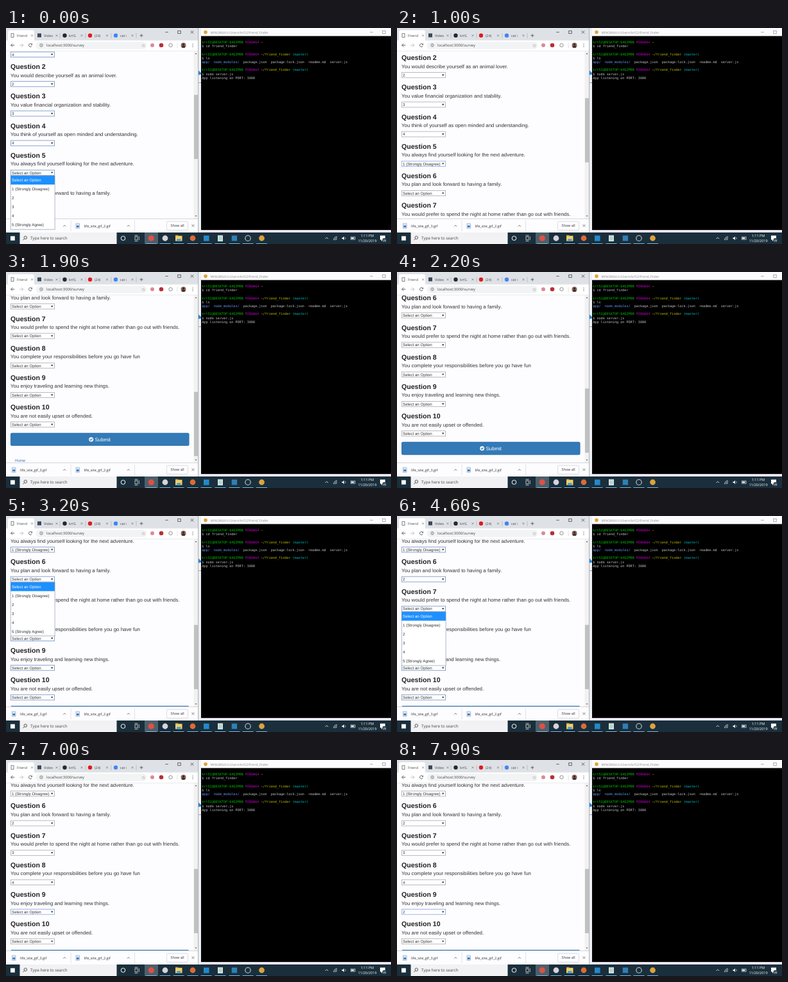
Recreate the animation shown at these times as an HTML page with a canvas. Size 600 by 338 pixels, loop 8 s.

```html
<!DOCTYPE html>
<html lang="en">
<head>
<meta charset="utf-8">
<title>Survey and server</title>
<style>
html, body { margin: 0; width: 100%; height: 100%; overflow: hidden; background: #fff; }
canvas { display: block; width: 600px; height: 338px; }
</style>
</head>
<body>
<canvas id="stage"></canvas>
<script>
const W = 600, H = 338, LOOP = 8000;
const canvas = document.getElementById('stage');
const ctx = canvas.getContext('2d', { alpha: false });
const dpr = window.devicePixelRatio || 1;
canvas.width = W * dpr;
canvas.height = H * dpr;
ctx.scale(dpr, dpr);
ctx.textRendering = 'geometricPrecision';

const ARIAL = '"Liberation Sans", Arial, sans-serif';
const UI = '"Open Sans", "Noto Sans", sans-serif';
const MONO = '"DejaVu Sans Mono", "Liberation Mono", monospace';
const PAGE = '#fdfcff';

const questions = [
  'You enjoy meeting new people.',
  'You would describe yourself as an animal lover.',
  'You value financial organization and stability.',
  'You think of yourself as open minded and understanding.',
  'You always find yourself looking for the next adventure.',
  'You plan and look forward to having a family.',
  'You would prefer to spend the night at home rather than go out with friends.',
  'You complete your responsibilities before you go have fun',
  'You enjoy traveling and learning new things.',
  'You are not easily upset or offended.'
];
const options = ['Select an Option', '1 (Strongly Disagree)', '2', '3', '4', '5 (Strongly Agree)'];

// time, focused question, highlighted option (-1: list closed)
const steps = [
  [0, 5, 0], [500, 5, 1], [700, 5, -1],
  [2800, 6, -1], [2900, 6, 0], [3500, 6, 1], [3600, 6, 2], [3700, 6, -1],
  [4200, 7, -1], [4300, 7, 0], [5000, 7, 3], [5100, 7, -1],
  [5800, 8, -1], [5900, 8, 0], [6300, 8, 1], [6400, 8, 3], [6500, 8, 4], [6600, 8, -1],
  [7000, 9, -1], [7100, 9, 0], [7700, 9, 1], [7800, 9, 2], [7900, 9, -1]
];
// question: [time answered, option]
const answers = { 1: [0, 4], 2: [0, 2], 3: [0, 3], 4: [0, 4], 5: [700, 1], 6: [3700, 2], 7: [5100, 3], 8: [6600, 4], 9: [7900, 2] };
const scrollKeys = [
  [900, 0], [1000, 14], [1100, 54], [1200, 102], [1300, 143.3], [1500, 186],
  [1700, 213], [1900, 218.7], [2100, 215], [2400, 184], [2700, 173.6]
];

function scrollAt(t) {
  if (t <= scrollKeys[0][0]) return 0;
  for (let i = 1; i < scrollKeys.length; i++) {
    const [t1, s1] = scrollKeys[i], [t0, s0] = scrollKeys[i - 1];
    if (t <= t1) return s0 + (s1 - s0) * (t - t0) / (t1 - t0);
  }
  return scrollKeys[scrollKeys.length - 1][1];
}

function rect(x, y, w, h, color) {
  ctx.fillStyle = color;
  ctx.fillRect(x, y, w, h);
}

function frame(x, y, w, h, color, width = 1) {
  ctx.strokeStyle = color;
  ctx.lineWidth = width;
  ctx.strokeRect(x, y, w, h);
}

function round(x, y, w, h, r, color) {
  ctx.fillStyle = color;
  ctx.beginPath();
  ctx.roundRect(x, y, w, h, r);
  ctx.fill();
}

function disc(x, y, r, color) {
  ctx.fillStyle = color;
  ctx.beginPath();
  ctx.arc(x, y, r, 0, Math.PI * 2);
  ctx.fill();
}

function ring(x, y, r, color, width) {
  ctx.strokeStyle = color;
  ctx.lineWidth = width;
  ctx.beginPath();
  ctx.arc(x, y, r, 0, Math.PI * 2);
  ctx.stroke();
}

function line(color, width, ...pts) {
  ctx.strokeStyle = color;
  ctx.lineWidth = width;
  ctx.beginPath();
  for (let i = 0; i < pts.length; i += 2) ctx.lineTo(pts[i], pts[i + 1]);
  ctx.stroke();
}

function poly(color, ...pts) {
  ctx.fillStyle = color;
  ctx.beginPath();
  for (let i = 0; i < pts.length; i += 2) ctx.lineTo(pts[i], pts[i + 1]);
  ctx.fill();
}

function text(str, x, y, size, color, family = ARIAL, weight = '', align = 'left') {
  ctx.font = `${weight} ${size}px ${family}`;
  ctx.fillStyle = color;
  ctx.textAlign = align;
  ctx.fillText(str, x, y);
}

function cross(x, y, r, color, width = 0.7) {
  line(color, width, x - r, y - r, x + r, y + r);
  line(color, width, x - r, y + r, x + r, y - r);
}

function minimize(x, y, color) {
  line(color, 0.7, x - 2.3, y, x + 2.3, y);
}

function maximize(x, y, color) {
  frame(x - 2.2, y - 2.2, 4.4, 4.4, color, 0.7);
}

function tab(x, label, width) {
  ctx.save();
  ctx.beginPath();
  ctx.rect(x, 4, width, 15);
  ctx.clip();
  text(label, x, 14, 5.4, '#45484c', UI);
  ctx.restore();
}

function drawBrowserTop() {
  rect(0, 0, 299.5, 20, '#dee1e6');
  round(3, 3.5, 41, 17, [3, 3, 0, 0], '#fff');
  rect(0, 19.5, 299.5, 17, '#fff');

  frame(8, 8.8, 4, 5.6, '#5f6368', 0.8);
  rect(49, 8.5, 6, 6, '#3b4754');
  disc(91.5, 11.7, 3.2, '#24292e');
  disc(131, 11.7, 3.2, '#e01b1b');
  disc(171, 11.7, 3.2, '#4285f4');
  tab(17, 'Friend', 16);
  tab(59, 'Video', 14);
  tab(98, 'krt52', 11);
  tab(138, '(24)', 13);
  tab(178, 'cat s', 10);
  for (const x of [40.5, 79, 118, 157.5, 197]) cross(x, 11.8, 1.5, '#5f6368', 0.6);
  for (const x of [84, 124, 164, 203]) line('#9a9fa6', 0.5, x, 8, x, 16);
  line('#444', 0.8, 208.5, 11.8, 213.5, 11.8);
  line('#444', 0.8, 211, 9.3, 211, 14.3);
  minimize(250.5, 6.5, '#333');
  maximize(270, 6.5, '#333');
  cross(290, 6.5, 2.3, '#333');

  for (const [x, d, c] of [[10.5, 1, '#4d5156'], [24, -1, '#b8bbbf']]) {
    line(c, 0.9, x - 2.8, 27, x + 2.8, 27);
    line(c, 0.9, x - d * 0.3, 24.4, x - d * 2.9, 27, x - d * 0.3, 29.6);
  }
  ctx.strokeStyle = '#4d5156';
  ctx.lineWidth = 0.9;
  ctx.beginPath();
  ctx.arc(38, 27, 2.5, 0.5, 5.5);
  ctx.stroke();
  poly('#4d5156', 38.6, 26.4, 41, 26.4, 41, 23.9);

  round(46.5, 21.5, 173, 11.6, 6, '#f1f3f4');
  ring(55, 27, 2.3, '#5f6368', 0.7);
  rect(54.7, 26.4, 0.7, 2, '#5f6368');
  rect(54.7, 25.3, 0.7, 0.7, '#5f6368');
  text('localhost:3000/survey', 63, 29, 5.8, '#44474b', UI);
  text('☆', 214, 29.7, 7.5, '#5f6368', '"DejaVu Sans", sans-serif', '', 'center');
  disc(228, 27, 3, '#d98a94');
  disc(242, 27, 3.3, '#b92f35');
  ring(256.5, 27, 2.7, '#777', 0.8);
  line('#c6c9cd', 0.6, 267, 23, 267, 32);

  // avatar
  ctx.save();
  ctx.beginPath();
  ctx.arc(276.5, 27, 4, 0, 7);
  ctx.clip();
  rect(272, 22, 9, 10, '#8d6a62');
  disc(276.5, 26, 1.8, '#3e2725');
  disc(276.5, 31.3, 3.3, '#3e2725');
  ctx.restore();
  for (const dy of [-2.2, 0, 2.2]) disc(291, 27 + dy, 0.6, '#4d5156');
  line('#d5d8dc', 0.6, 0, 36, 299.5, 36);
}

const headingY = (n, scroll) => 60.4 + 46.22 * (n - 2) - scroll;

function drawSelect(cy, label, focused, open) {
  rect(7, cy - 4.5, 69, 9, '#fff');
  const edge = open ? '#6f8fc0' : focused ? '#86a4e4' : '#a9a9a9';
  frame(7.4, cy - 4.1, 68.2, 8.2, edge, 0.8);
  text(label, 9, cy + 2.2, 6.2, '#333');
  poly('#333', 70, cy - 1.2, 73.4, cy - 1.2, 71.7, cy + 1.5);
}

function drawPage(t, scroll, focus, open) {
  ctx.save();
  ctx.beginPath();
  ctx.rect(0, 36.3, 292.5, 262);
  ctx.clip();
  rect(0, 36, 293, 263, PAGE);
  questions.forEach((q, i) => {
    const n = i + 1, y = headingY(n, scroll);
    if (y < 0 || y > 320) return;
    text('Question ' + n, 7, y + 3.7, 10.6, '#222', ARIAL, 'bold');
    text(q, 7, y + 16.2, 7.9, '#333');
    const a = answers[n];
    drawSelect(y + 27.3, options[a && t >= a[0] ? a[1] : 0], n === focus, open);
  });

  const top = 470.5 - scroll;
  round(7, top, 278.5, 20.3, 2.5, '#2e6da4');
  round(7.4, top + 0.4, 277.7, 19.5, 2.2, '#337ab7');
  disc(132.7, top + 10.2, 3.5, '#fff');
  line('#337ab7', 1.2, 130.9, top + 10.2, 132.2, top + 11.6, 134.6, top + 8.9);
  text('Submit', 138.5, top + 13, 7.9, '#fff');
  text('Home', 14, top + 45.2, 6.1, '#337ab7');
  ctx.restore();

  rect(292.5, 36.3, 7, 262, '#f1f1f1');
  rect(293, 104.5 + scroll * 0.38, 6, 100.5, '#c1c1c1');
  poly('#505050', 294.6, 41, 297.4, 41, 296, 39.3);
  poly('#505050', 294.6, 293.6, 297.4, 293.6, 296, 295.3);
}

function drawDownloads() {
  rect(0, 298.3, 299.5, 22, PAGE);
  line('#c4c7ca', 0.7, 0, 298.6, 299.5, 298.6);
  ['life_site_gif_3.gif', 'life_site_gif_2.gif'].forEach((name, i) => {
    const x = i * 99.5;
    rect(x + 9.5, 306, 5.5, 7.5, '#dfe9f5');
    frame(x + 9.5, 306, 5.5, 7.5, '#7d9cc4', 0.6);
    rect(x + 10.5, 309, 3.6, 3, '#3f7cc4');
    text(name, x + 22, 312, 5.5, '#333', UI);
    line('#555', 0.8, x + 89.3, 310.6, x + 91.3, 308.6, x + 93.3, 310.6);
    line('#d0d3d6', 0.6, x + 101, 301, x + 101, 318);
  });
  ctx.beginPath();
  ctx.roundRect(250.5, 302.7, 33, 13.6, 1.5);
  ctx.strokeStyle = '#cfd2d6';
  ctx.lineWidth = 0.7;
  ctx.stroke();
  text('Show all', 267, 311.2, 5.5, '#333', UI, '', 'center');
  cross(291.5, 309.3, 1.9, '#555');
}

function drawList(cy, hot) {
  const h = 84.6, below = cy + 4.4;
  const y = below + h > 320 ? cy - 4.4 - h : below;
  rect(7, y, 69.3, h, '#fff');
  options.forEach((o, i) => {
    const top = y + 0.2 + i * 14;
    if (i === hot) rect(7, top, 69, 14, '#1e90ff');
    text(o, 9, top + 9.4, 6.2, i === hot ? '#fff' : '#333');
  });
  frame(7.2, y + 0.2, 68.9, h - 0.4, '#8a9bb5', 0.7);
}

function drawTerminal() {
  rect(299.5, 0, 5, 320, '#eef0f3');
  line('#8d949c', 0.7, 299.6, 0, 299.6, 320);
  poly('#2f86d6', 300, 66.5, 304.3, 70.5, 304.3, 72.5, 300, 73.5);
  for (const x of [300.4, 301.9, 303.4]) rect(x, 85.2, 0.9, 0.9, '#555');

  rect(304, 0, 296, 320, '#fcfbfe');
  rect(304, 12.6, 296, 303.6, '#000');
  rect(304, 316.2, 296, 3.8, '#e9e4f0');
  disc(311, 6.6, 2.8, '#e0a33a');
  text('MINGW64:/c/Users/krt52/friend_finder', 318.5, 8.6, 5, '#8a8a8e', UI);
  minimize(569.5, 6.6, '#888');
  maximize(589, 6.6, '#888');

  const cell = 3.07, green = '#00bf00', pink = '#bf00bf', gold = '#bfbf00', cyan = '#00bfbf', gray = '#c4c4c4', blue = '#6c9cff';
  const prompt = [['krt52@DESKTOP-64Q2M9B ', green], ['MINGW64 ', pink]];
  const inRepo = [...prompt, ['~/friend_finder ', gold], ['(master)', cyan]];
  const rows = [
    [...prompt, ['~', gold]],
    [['$ cd friend_finder', gray]],
    [],
    inRepo,
    [['$ ls', gray]],
    [['app/  node_modules/  ', blue], ['package.json  package-lock.json  readme.md  server.js', gray]],
    [],
    inRepo,
    [['$ node server.js', gray]],
    [['App listening on PORT: 3000', gray]]
  ];
  rows.forEach((row, i) => {
    let col = 0;
    for (const [str, color] of row) {
      text(str, 305.3 + col * cell, 24.3 + i * 6.17, 5.1, color, MONO);
      col += str.length;
    }
  });
}

function drawTaskbar() {
  rect(0, 320, W, 18, '#1a2f3b');
  rect(7, 325.7, 6.8, 6.8, '#fff');
  rect(21.5, 320, 151, 18, '#f2f2f4');
  ring(30.3, 328, 2.3, '#333', 0.8);
  line('#333', 0.8, 28.7, 329.7, 26.4, 332);
  text('Type here to search', 38, 331.4, 6.3, '#444', UI);

  ring(182.5, 329, 3.3, '#fff', 1);
  frame(201, 326.5, 4, 5, '#ddd', 0.8);
  line('#ddd', 0.8, 207.3, 326, 207.3, 332);
  line('#ddd', 0.8, 200.5, 324.5, 205.5, 324.5);
  line('#ddd', 0.8, 200.5, 333.5, 205.5, 333.5);

  rect(216, 320, 21, 18, '#4d5f6a');
  disc(226.3, 329, 4.6, '#dd5144');
  disc(248, 329, 4.4, '#d8d3dc');
  rect(264, 325.2, 10.5, 8.2, '#f4cf62');
  rect(264, 324.2, 4.5, 1.5, '#d9a93a');
  rect(266.2, 330, 6.2, 3.4, '#4a9fd8');
  disc(291, 329, 4.4, '#de6a35');
  rect(308, 324.8, 8.6, 8.6, '#2489ca');
  rect(330, 324.4, 8, 9.4, '#d8e8e4');
  for (const y of [327, 329, 331]) line('#6f9c96', 0.6, 331.3, y, 336.7, y);
  rect(351.7, 324.8, 8.4, 8.4, '#2f7fb5');
  ring(377, 329, 4.2, '#d4d4d4', 1.1);
  disc(398.5, 329, 4.4, '#dda23c');
  for (const x of [226.3, 248, 269, 291, 312, 334, 356, 377, 398.5]) rect(x - 8.5, 337, 17, 1, '#76b9ed');

  const ink = '#eee';
  line(ink, 0.8, 497.5, 330, 499.8, 327.7, 502.1, 330);
  ctx.strokeStyle = ink;
  ctx.lineWidth = 0.7;
  for (const r of [2, 3.8, 5.6]) {
    ctx.beginPath();
    ctx.arc(516, 332, r, Math.PI, Math.PI * 1.5);
    ctx.stroke();
  }
  poly(ink, 523.5, 328, 525, 328, 527, 326, 527, 332, 525, 330, 523.5, 330);
  line(ink, 0.6, 528.6, 327.3, 529.3, 329, 528.6, 330.7);
  frame(537.5, 327, 6.5, 4, ink, 0.7);
  rect(538.3, 327.8, 4, 2.4, ink);

  text('1:11 PM', 563, 327.2, 5.5, '#fff', UI, '', 'center');
  text('11/20/2019', 563, 335.2, 5.5, '#fff', UI, '', 'center');
  rect(583, 324.8, 8, 6.6, '#fff');
  poly('#fff', 585, 331, 588, 331, 585, 333.8);
  disc(589.8, 332.2, 3.4, '#30424d');
  text('26', 589.8, 333.8, 4.4, '#fff', UI, '', 'center');
}

function draw(now) {
  const t = Math.floor((now % LOOP) / 100) * 100;
  const [, focus, hot] = steps.filter(s => s[0] <= t).pop();
  const scroll = scrollAt(t);

  rect(0, 0, W, H, '#fff');
  drawPage(t, scroll, focus, hot >= 0);
  drawBrowserTop();
  drawDownloads();
  drawTerminal();
  drawTaskbar();
  if (hot >= 0) drawList(headingY(focus, scroll) + 27.3, hot);
}

const start = performance.now();
function tick() {
  draw(performance.now() - start);
  requestAnimationFrame(tick);
}
tick();
</script>
</body>
</html>
```
